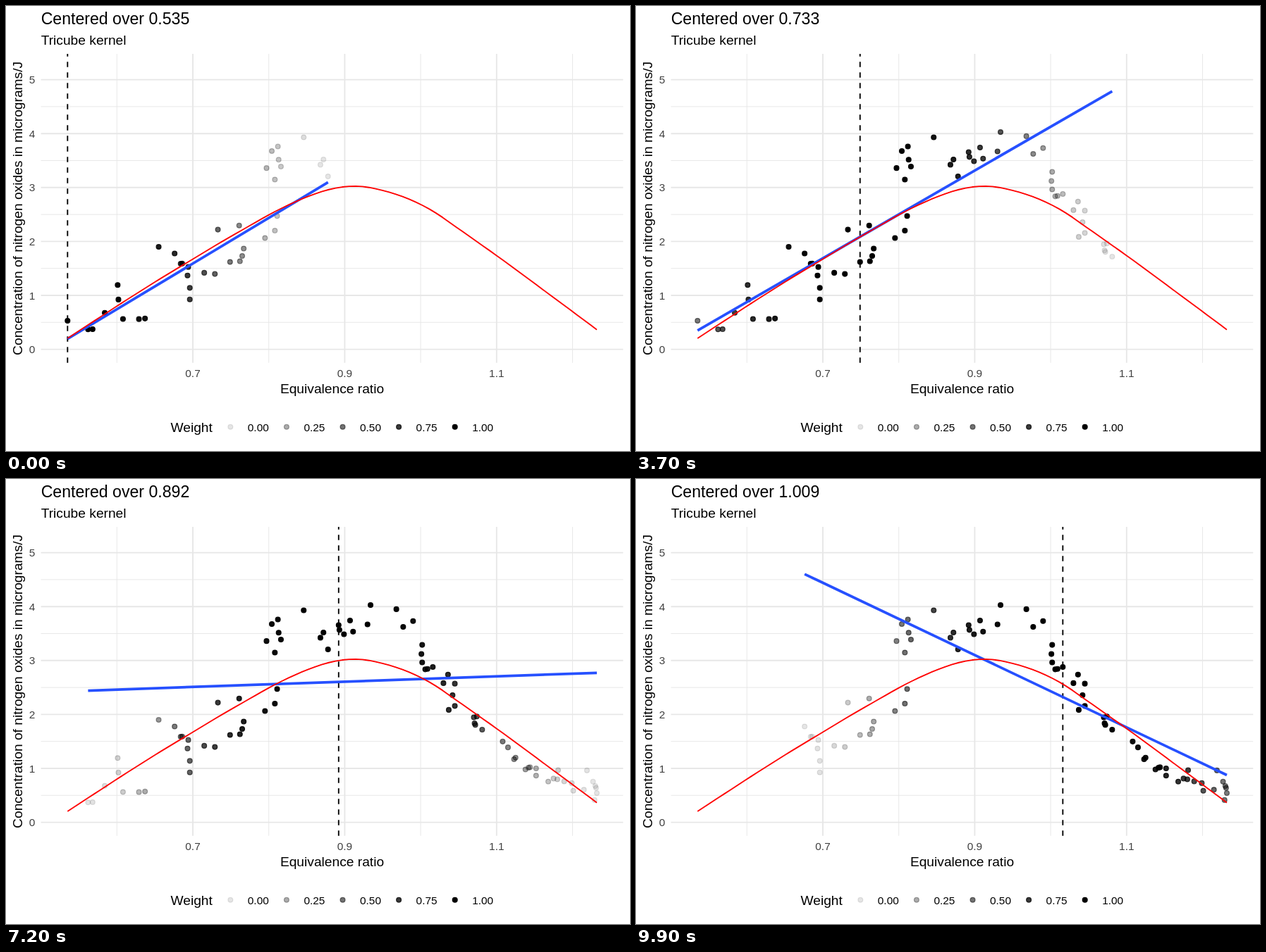
Recreate the animation shown at these times as an HTML page. Size 885x632 px, loop 10000 ms.

```html
<!DOCTYPE html>
<html lang="en">
<head>
<meta charset="utf-8">
<title>Local regression</title>
<style>
html, body { margin: 0; width: 100%; height: 100%; overflow: hidden; background: #fff; }
svg { display: block; font-family: "Liberation Sans", Arial, sans-serif; font-size: 19.2px; }
.small { font-size: 15.4px; }
.tick { fill: #404040; }
</style>
</head>
<body>
<svg id="plot" width="885" height="632" viewBox="0 0 885 632"></svg>
<script>
const ratio = [
  .907, .761, 1.108, 1.016, 1.189, 1.001, 1.231, 1.123,
  1.042, 1.215, .930, 1.152, 1.138, .601, .696, .686,
  1.072, 1.074, .934, .808, 1.071, 1.009, 1.142, 1.229,
  1.175, .568, .977, .767, 1.006, .893, 1.152, .693,
  1.232, 1.036, 1.125, 1.081, .868, .762, 1.144, 1.045,
  .797, 1.115, 1.070, 1.219, .637, .733, .715, .872,
  .765, .878, .811, .676, 1.045, .968, .846, .684,
  .729, .911, .808, 1.168, .749, .892, 1.002, .812,
  1.230, .804, .813, 1.002, .696, 1.199, 1.030, .602,
  .694, .816, 1.037, 1.181, .899, 1.227, 1.180, .795,
  .990, 1.201, .629, .608, .584, .562, .535, .655];
const nox = [
  3.741, 2.295, 1.498, 2.881, .760, 3.120, .638, 1.170,
  2.358, .606, 3.669, 1.000, .981, 1.192, .926, 1.590,
  1.806, 1.962, 4.028, 3.148, 1.836, 2.845, 1.013, .414,
  .812, .374, 3.623, 1.869, 2.836, 3.567, .866, 1.369,
  .542, 2.739, 1.200, 1.719, 3.423, 1.634, 1.021, 2.157,
  3.361, 1.390, 1.947, .962, .571, 2.219, 1.419, 3.519,
  1.732, 3.206, 2.471, 1.777, 2.571, 3.952, 3.931, 1.587,
  1.397, 3.536, 2.202, .756, 1.620, 3.656, 2.964, 3.760,
  .672, 3.677, 3.517, 3.290, 1.139, .727, 2.581, .923,
  1.527, 3.388, 2.085, .966, 3.488, .754, .797, 2.064,
  3.732, .586, .561, .563, .678, .370, .530, 1.900];

const data = ratio.map((x, i) => ({ x, y: nox[i] })).sort((a, b) => a.x - b.x);
const centers = [...new Set(data.map(p => p.x))];
const first = data[0].x, last = data[data.length - 1].x;
const BAND = .355, SPAN = .75, CELL = .2;
const LEFT = 49.6, RIGHT = 875.3, TOP = 68, BOTTOM = 506.8;

const px = x => 265 + (x - .7) * 1077;
const py = y => 487.6 - y * 76.6;

const tricube = u => u < 1 ? (1 - u ** 3) ** 3 : 0;

// Weighted straight line around c: its value at c and its slope
function localLine(c, h) {
  let s = 0, sx = 0, sy = 0, sxx = 0, sxy = 0;
  for (const p of data) {
    const d = p.x - c, w = tricube(Math.abs(d) / h);
    s += w; sx += w * d; sy += w * p.y; sxx += w * d * d; sxy += w * d * p.y;
  }
  const slope = (s * sxy - sx * sy) / (s * sxx - sx * sx);
  return { x: c, y: (sy - slope * sx) / s, slope };
}

// Loess of degree 1: exact fits at the cell borders, cubic blending between
function loess() {
  const n = data.length, near = Math.floor(n * SPAN), maxCell = Math.floor(n * SPAN * CELL);
  const margin = (last - first) * .1;
  const knots = [first - margin, last + margin];
  (function split(lo, hi) {
    if (hi - lo + 1 <= maxCell) return;
    const mid = Math.floor((lo + hi) / 2);
    knots.push((data[mid - 1].x + data[mid].x) / 2);
    split(lo, mid);
    split(mid + 1, hi);
  })(1, n);
  const fits = knots.sort((a, b) => a - b).map(c => {
    const dist = data.map(p => Math.abs(p.x - c)).sort((a, b) => a - b);
    return localLine(c, dist[near - 1]);
  });
  return x => {
    const i = fits.findIndex(f => f.x >= x), a = fits[i - 1], b = fits[i];
    const w = b.x - a.x, t = (x - a.x) / w, r = 1 - t;
    return r * r * (1 + 2 * t) * a.y + t * t * (1 + 2 * r) * b.y
      + w * t * r * (r * a.slope - t * b.slope);
  };
}

const svg = document.getElementById("plot");
function add(tag, attrs, text = "") {
  const el = document.createElementNS("http://www.w3.org/2000/svg", tag);
  set(el, attrs);
  el.textContent = text;
  return svg.appendChild(el);
}
function set(el, attrs) {
  for (const k in attrs) el.setAttribute(k, attrs[k]);
}
const line = (x1, y1, x2, y2, stroke, width) =>
  add("line", { x1, y1, x2, y2, stroke, "stroke-width": width });
const label = (text, x, y, attrs) => add("text", { x, y, ...attrs }, text);
const dot = (cx, cy) => add("circle", { cx, cy, r: 3.42, stroke: "#000", "stroke-width": 1.24 });
function shade(el, weight) {
  const a = .1 + .9 * weight;
  set(el, { "fill-opacity": a, "stroke-opacity": a });
}

// Grid, minor lines first
const GRID = "#e7e7e7";
const gridX = (x, w) => line(px(x), TOP, px(x), BOTTOM, GRID, w);
const gridY = (y, w) => line(LEFT, py(y), RIGHT, py(y), GRID, w);
[.6, .8, 1, 1.2].forEach(x => gridX(x, .95));
[.5, 1.5, 2.5, 3.5, 4.5].forEach(y => gridY(y, .95));
[.7, .9, 1.1].forEach(x => {
  gridX(x, 1.87);
  label(x, px(x), 526.7, { class: "small tick", "text-anchor": "middle" });
});
[0, 1, 2, 3, 4, 5].forEach(y => {
  gridY(y, 1.87);
  label(y, 41.3, py(y) + 5.5, { class: "small tick", "text-anchor": "end" });
});

// Titles and legend
const title = label("", 49.7, 26.2, { "font-size": 23.1 });
label("Tricube kernel", 49.7, 54.6);
label("Equivalence ratio", 462.5, 549.8, { "text-anchor": "middle" });
label("Concentration of nitrogen oxides in micrograms/J", 0, 0,
  { "text-anchor": "middle", transform: "translate(22.8 287.4) rotate(-90)" });
label("Weight", 233.5, 604.8);
[0, .25, .5, .75, 1].forEach((w, i) => {
  shade(dot(318.3 + i * 79.6, 597.8), w);
  label(w.toFixed(2), 342.8 + i * 79.6, 603.5, { class: "small" });
});

// Data layers
const dots = data.map(p => dot(px(p.x), py(p.y)));
const marker = line(0, BOTTOM, 0, TOP, "#000", 1.87);
set(marker, { "stroke-dasharray": "7.5 7.5" });
const fitLine = line(0, 0, 0, 0, "#2650ff", 3.73);
const smooth = loess();
const curve = Array.from({ length: 80 }, (_, i) => {
  const x = first + (last - first) * i / 79;
  return px(x).toFixed(2) + "," + py(smooth(x)).toFixed(2);
});
add("polyline", { points: curve.join(" "), fill: "none", stroke: "#f00",
  "stroke-width": 1.87, "stroke-linejoin": "round" });

// Each centre lasts two steps; the title follows one step late
function draw(step) {
  const c = centers[Math.ceil(step / 2)];
  title.textContent = "Centered over " + centers[Math.floor(step / 2)];
  set(marker, { x1: px(c), x2: px(c) });
  data.forEach((p, i) => {
    const d = Math.abs(p.x - c);
    dots[i].style.display = d < BAND ? "" : "none";
    shade(dots[i], tricube(d / BAND));
  });
  const xs = data.map(p => p.x).filter(x => Math.abs(x - c) < BAND);
  const a = xs[0], b = xs[xs.length - 1], fit = localLine(c, BAND);
  const at = x => py(fit.y + fit.slope * (x - c));
  set(fitLine, { x1: px(a), y1: at(a), x2: px(b), y2: at(b) });
}

let shown = -1;
function tick() {
  const step = Math.floor(performance.now() % 10000 / 100);
  if (step !== shown) draw(shown = step);
  requestAnimationFrame(tick);
}
tick();
</script>
</body>
</html>
```
